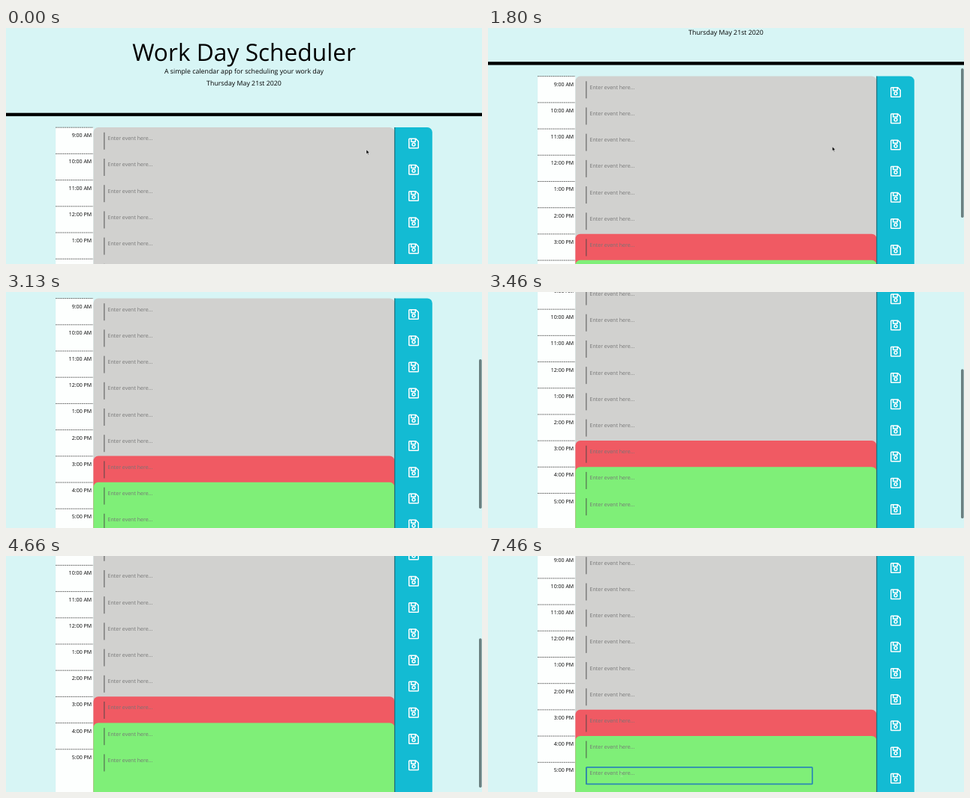
Animation of 634 by 316 pixels, one loop 8 s. Source, as an HTML page:

```html
<!DOCTYPE html>
<html lang="en">
<head>
<meta charset="utf-8">
<title>Work Day Scheduler</title>
<style>
  html, body { margin: 0; width: 100%; height: 100%; overflow: hidden; background: #d7f5f5; }
  svg { display: block; width: 634px; height: 316px; font-family: "Open Sans", "Noto Sans", sans-serif; text-rendering: geometricPrecision; }
  .time { font-size: 7.04px; text-anchor: end; }
  .hint { font-size: 7.04px; fill: #757575; }
  .lead { font-size: 8.8px; text-anchor: middle; }
</style>
</head>
<body>
<svg viewBox="0 0 634 316">
  <defs>
    <g id="save" fill="none" stroke="#fff" stroke-width="1.5" stroke-linejoin="round">
      <path d="M1.5 .75H9.9L13.25 4.1V12.5Q13.25 13.25 12.5 13.25H1.5Q.75 13.25 .75 12.5V1.5Q.75 .75 1.5 .75Z"/>
      <path d="M3.75 .75V4.75H9.25V.75"/>
      <circle cx="7" cy="8.5" r="2"/>
    </g>
  </defs>
  <rect width="634" height="316" fill="#d7f5f5"/>
  <g id="page">
    <text x="317" y="44" font-size="31.68" text-anchor="middle">Work Day Scheduler</text>
    <text class="lead" x="317" y="61.3">A simple calendar app for scheduling your work day</text>
    <text class="lead" x="317" y="77.2">Thursday May 21st 2020</text>
    <rect y="113.7" width="634" height="4.4"/>
    <rect x="66.2" y="133" width="50.2" height="345" fill="#fdfffe"/>
    <g id="blocks"></g>
    <path d="M517.6 133H561.2A6.6 6.6 0 0 1 567.8 139.6V471.4A6.6 6.6 0 0 1 561.2 478H517.6Z" fill="#13bbd3"/>
    <path d="M517.8 133V478" stroke="#123c44" stroke-width=".8"/>
    <g id="rows"></g>
    <rect id="ring" x="131" y="421.3" width="301" height="22.6" rx="1" fill="none" stroke="#2c88b4" stroke-width="1.7"/>
  </g>
  <rect id="bar" x="630" width="3.6" height="200" rx="1.8" fill="#6a7f80"/>
  <path id="arrow" d="M0 0V5.6L1.4 4.4L2.3 6.4L3.2 6L2.3 4.1H4Z" stroke="#fff" stroke-width=".4"/>
  <path id="beam" d="M-1.8 -3.8Q0 -3.8 0 -2.8Q0 -3.8 1.8 -3.8M0 -2.8V2.8M-1.8 3.8Q0 3.8 0 2.8Q0 3.8 1.8 3.8" fill="none" stroke="#c9edc3" stroke-width=".9"/>
</svg>
<script>
const LOOP = 8000, TOP = 133, ROW = 35.2, END = 478;
const $ = id => document.getElementById(id);

const block = (row, color) => {
  const y = TOP + row * ROW;
  return `<rect x="116.4" y="${y}" width="401.2" height="${END - y}" rx="6.6" fill="${color}"/>`;
};
$('blocks').innerHTML = block(0, '#d1d1cf') + block(6, '#f05a63') + block(7, '#7fef78');

const hourLabel = h => `${h % 12 || 12}:00 ${h < 12 ? 'AM' : 'PM'}`;
$('rows').innerHTML = Array.from({ length: 9 }, (_, i) => `
  <g transform="translate(0 ${TOP + i * ROW})">
    <path d="M66.2 .2H116.4" stroke="#222" stroke-width=".8" stroke-dasharray="1.5 1"/>
    <text class="time" x="114.2" y="13.2">${hourLabel(9 + i)}</text>
    <path d="M130.9 6.8V29.8" stroke="#444" stroke-width=".9"/>
    <text class="hint" x="135.5" y="17.3">Enter event here...</text>
    <use href="#save" x="536" y="14.6"/>
  </g>`).join('');

// Monotone cubic through [time, value] points
function track(points) {
  const n = points.length;
  const slope = i => (points[i + 1][1] - points[i][1]) / (points[i + 1][0] - points[i][0]);
  const tangent = i => {
    if (i === 0 || i === n - 1) return 0;
    const a = slope(i - 1), b = slope(i);
    return a * b <= 0 ? 0 : 2 * a * b / (a + b);
  };
  return t => {
    if (t <= points[0][0]) return points[0][1];
    if (t >= points[n - 1][0]) return points[n - 1][1];
    const i = points.findIndex(p => p[0] > t) - 1;
    const [t0, v0] = points[i], [t1, v1] = points[i + 1];
    const d = t1 - t0, u = (t - t0) / d, w = 1 - u;
    return w * w * (1 + 2 * u) * v0 + u * u * (3 - 2 * u) * v1
      + d * u * w * (w * tangent(i) - u * tangent(i + 1));
  };
}

const scrollAt = track([[960, 0], [1130, 9], [1400, 37], [1800, 68.5], [2250, 78], [2680, 78],
  [2900, 98], [3130, 124.5], [3500, 147], [3950, 162], [4500, 162], [4800, 149], [5250, 138.5]]);
const barAlpha = track([[980, 0], [1060, 1], [5400, 1], [5640, 0]]);
const arrowX = track([[60, 480], [460, 458.6]]);
const arrowY = track([[60, 163], [460, 159]]);
const beamX = track([[5800, 235], [6600, 178]]);
const beamY = track([[5800, 262.5], [6600, 292]]);

const show = (id, on) => $(id).setAttribute('visibility', on ? 'visible' : 'hidden');
const move = (id, x, y) => $(id).setAttribute('transform', `translate(${x} ${y})`);

function draw(t) {
  const scroll = scrollAt(t);
  move('page', 0, -scroll);
  move('bar', 0, 10 + scroll * 0.642);
  $('bar').setAttribute('opacity', barAlpha(t));
  move('arrow', arrowX(t), arrowY(t));
  show('arrow', t < 2530);
  move('beam', beamX(t), beamY(t));
  show('beam', t >= 5400);
  $('beam').setAttribute('opacity', t < 6800 ? 0.9 : 0.35);
  show('ring', t >= 6800);
}

const start = performance.now();
function tick() {
  draw((performance.now() - start) % LOOP);
  requestAnimationFrame(tick);
}
tick();
</script>
</body>
</html>
```
